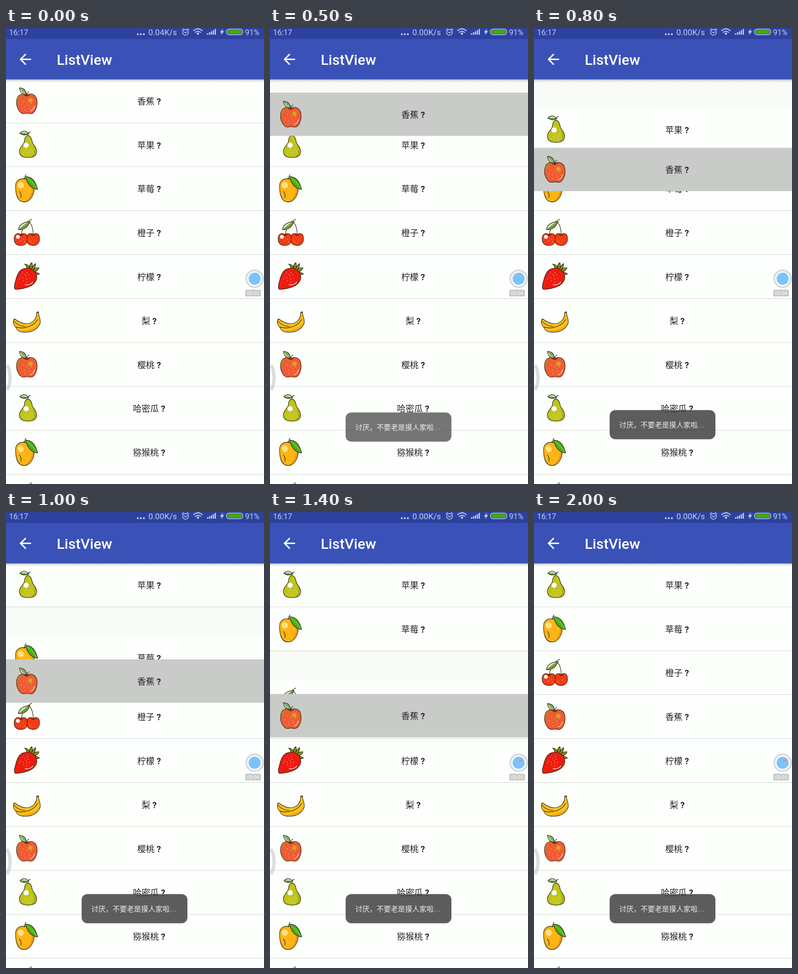
An HTML page for the animation above (2.1 s loop, 539 by 953 pixels).

```html
<!DOCTYPE html>
<html lang="zh-CN">
<head>
<meta charset="utf-8">
<title>ListView</title>
<style>
html, body { margin: 0; width: 100%; height: 100%; overflow: hidden; background: #fdfffd; }
svg { display: block; width: 539px; height: 953px; }
text { font-family: Roboto, "Noto Sans CJK SC", "Noto Sans CJK", sans-serif; }
.label { font-size: 18px; fill: #222; text-anchor: middle; }
.label tspan { font-weight: 700; }
.ink { stroke: #26200f; stroke-width: 1.1; stroke-linejoin: round; stroke-linecap: round; }
.line { fill: none; }
.status { fill: #c8d0ef; font-size: 17px; }
</style>
</head>
<body>
<svg viewBox="0 0 539 953" xmlns="http://www.w3.org/2000/svg">
  <defs>
    <linearGradient id="shade" x2="0" y2="1">
      <stop stop-color="#555" stop-opacity=".5"/>
      <stop offset=".4" stop-color="#777" stop-opacity=".16"/>
      <stop offset="1" stop-color="#999" stop-opacity="0"/>
    </linearGradient>

    <g id="apple">
      <path class="ink" fill="#ef5c35" d="M43-13C37-17 22-17 22 3C22 15 30 26 36 26C40 26 41 25 44 25C47 25 48 26 52 26C59 26 65 14 65 3C65-17 50-17 43-13Z"/>
      <path fill="#cf7a1c" d="M35-14C25-14 22-6 23 4C25 6 26-5 35-14Z"/>
      <circle cx="51" cy="-2" r="6" fill="#d8841d"/><circle cx="51" cy="-2" r="3.5" fill="#e2a134"/>
      <path class="ink line" d="M38-13Q43-9 49-13M44-11Q42-17 48-20"/>
      <path class="ink" fill="#86ad62" d="M28-28Q41-28 43-14Q30-14 28-28Z"/>
      <path fill="#c8e6d0" d="M29-27Q30-16 41-15Q34-18 29-27Z"/>
      <path stroke="#ffd9c4" stroke-width="1.2" fill="none" d="M50 21Q58 18 60 10"/>
    </g>

    <g id="pear">
      <path class="ink" fill="#bfc41b" d="M46-20C52-20 54-12 55-6C57 0 64 4 64 13C64 22 58 26 46 26C34 26 28 22 28 13C28 4 36 0 38-6C39-13 40-20 46-20Z"/>
      <path fill="#a9af16" d="M56-1C64 6 66 22 52 25C60 18 60 8 56-1Z"/>
      <circle cx="42" cy="0" r="5.5" fill="#fff"/>
      <path class="ink line" d="M46-20Q45-26 51-28"/>
      <path class="ink" fill="#66a32c" d="M29-25Q38-34 48-24Q38-18 29-25Z"/>
      <path fill="#cbe9d4" d="M31-25.5Q38-32 46-25Z"/>
    </g>

    <g id="mango">
      <path class="ink" fill="#fdb515" d="M41-22C30-22 20-20 20-6C20 6 22 27 38 27C50 27 58 14 59 0C59-12 52-20 41-22Z"/>
      <path fill="#e6930f" d="M58 0C58 14 50 26 39 26C50 20 55 10 54-2Z"/>
      <circle cx="31" cy="-8" r="6.5" fill="#ffdf88"/>
      <path class="ink line" d="M28 5Q33 10 31 18M38-20Q39-27 42-30"/>
      <path class="ink" fill="#4bad16" d="M41-26Q60-26 66 1Q46-2 41-26Z"/>
      <path stroke="#b8e07a" fill="none" d="M43-24Q54-16 64-1"/>
    </g>

    <g id="cherry">
      <path class="ink" fill="#f23c15" d="M57 3C50-1 43 2 43 13C43 22 49 26 57 26C65 26 70 21 70 12C70 1 63-1 57 3Z"/>
      <path class="ink" fill="#f23c15" d="M31 3C24-1 17 2 17 12C17 22 23 26 31 26C39 26 45 22 45 13C45 1 38-1 31 3Z"/>
      <circle cx="25" cy="8" r="4" fill="#fff"/>
      <path class="ink line" d="M27 4Q31 6 35 4M53 4Q57 6 61 4M32 4Q35-19 54-29M57 4Q57-13 49-23"/>
      <path class="ink" fill="#7e9b2d" d="M26-7Q28-22 50-24Q44-6 26-7Z"/>
      <path fill="#c6ead6" d="M27-8Q29-20 46-23Q37-16 27-8Z"/>
    </g>

    <g id="strawberry">
      <path class="ink" fill="#84931d" d="M43-17Q44-23 39-27Q47-26 50-19Q48-26 54-30Q56-24 54-18Q57-25 62-28Q62-20 57-15Q63-20 69-19Q66-12 59-11Q65-10 70-6Q64-3 59-7Z"/>
      <path class="ink" fill="#ee1b0f" d="M42-18C30-18 24-8 20 8C16 22 17 27 22 26C34 25 52 22 60 12C66 4 65-4 61-10C55-17 48-20 42-18Z"/>
      <path stroke="#ffd8c8" stroke-width="1.6" fill="none" stroke-linecap="round" d="M40 16Q49 18 56 11"/>
    </g>

    <g id="banana">
      <path class="ink" fill="#fcc21d" d="M64-18L68-19C67-10 74-2 71 6C66 18 54 24 40 24C30 24 22 20 21 14C17 10 14 5 16-2L18-4C26 2 34 6 42 6C56 6 65-4 64-18Z"/>
      <path fill="#f0a916" d="M70 2C67 13 50 20 30 21Q34 23 42 23C58 22 70 14 70 2Z"/>
      <path class="ink line" d="M21 13C36 18 58 12 66-3M17 1Q25 11 40 12"/>
      <path class="ink" d="M64-17L68-18M16-2L18-3"/>
    </g>
  </defs>

  <rect width="539" height="953" fill="#f9fbf9"/>
  <g id="dividers" fill="#d6d8d5"></g>
  <g id="rows"></g>

  <path d="M4 707Q13 731 4 754" fill="none" stroke="#000" stroke-opacity=".13" stroke-width="7" stroke-linecap="round"/>

  <rect y="107" width="539" height="8" fill="url(#shade)"/>
  <rect width="539" height="107.3" fill="#3a52b7"/>
  <rect width="539" height="23" fill="#2d429f"/>
  <path transform="translate(22.3 47.5) scale(1.5)" fill="#fff" d="M20 11H7.83l5.59-5.59L12 4l-8 8 8 8 1.41-1.41L7.83 13H20z"/>
  <text x="106" y="76.5" font-size="30.2" font-weight="500" fill="#fff">ListView</text>

  <g class="status">
    <text x="6.5" y="15" style="font-size:16px">16:17</text>
    <circle cx="275.5" cy="13" r="2"/><circle cx="281.7" cy="13" r="2"/><circle cx="288" cy="13" r="2"/>
    <text id="speed" x="297.5" y="15"></text>
    <text x="499.5" y="15" style="font-size:16px">91%</text>
    <g fill="none" stroke="#c8d0ef" stroke-width="1.5" stroke-linecap="round">
      <circle cx="375" cy="9" r="6"/>
      <path d="M372.5 8L375 10.5L378 8M368 4L371 1.5M382 4L379 1.5"/>
      <path stroke-width="2" d="M392 5.5Q401-2 410 5.5M395.500 9Q401 4.500 406.500 9"/>
      <rect x="460.5" y="2.5" width="34" height="11.5" rx="5"/>
    </g>
    <path d="M398 11Q401 8.5 404 11L401 15ZM420 14V11h2.5v3ZM424 14V9h2.5v5ZM428 14V7h2.5v7ZM432 14V4.5h2.5V14ZM436 14V2h2.5v12ZM453 1L447 9.500H450.5L449 15L456 6.5H452Z"/>
    <rect x="462.5" y="4.3" width="30" height="8" rx="3.5" fill="#40ad0b"/>
  </g>

  <g id="toast">
    <rect x="158" y="798.6" width="221" height="61" rx="12" fill="#404240" fill-opacity=".85"/>
    <text x="178" y="835.3" font-size="14.9" font-weight="300" fill="#ececec">讨厌，不要老是摸人家啦<tspan font-size="17" letter-spacing="1">...</tspan></text>
  </g>

  <circle cx="519.5" cy="524" r="17.5" fill="none" stroke="#000" stroke-opacity=".14" stroke-width="4"/>
  <circle cx="519.5" cy="524" r="12.7" fill="#7cc3fd"/>
  <circle id="blip" cx="524" cy="520" r="3.2" fill="#f58a8c"/>
  <rect x="500" y="547" width="32.5" height="14" rx="2" fill="#c5c8c5"/>
  <text id="timer" x="516.3" y="558" font-size="10.5" fill="#fff" text-anchor="middle"></text>
</svg>
<script>
const PITCH = 91.8, TOP = 107, STEP = 100, LOOP = 2100;
const icons = ['apple', 'pear', 'mango', 'cherry', 'strawberry', 'banana'];
const names = ['香蕉', '苹果', '草莓', '橙子', '柠檬', '梨', '樱桃', '哈密瓜', '猕猴桃', '西瓜'];
const $ = id => document.getElementById(id);

// Speckles scattered in an ellipse on the fruit skin: count, cx, cy, rx, ry, colour
const speckles = {
  apple: [9, 43, 9, 16, 11, '#ffc9a8'],
  pear: [12, 47, 15, 13, 8, '#f3f5c0'],
  cherry: [8, 45, 17, 20, 5, '#ffb8a0'],
  strawberry: [12, 39, 0, 13, 11, '#ffe0d0']
};
for (const [id, [count, cx, cy, rx, ry, fill]] of Object.entries(speckles)) {
  for (let i = 0; i < count; i++) {
    const r = Math.sqrt((i + .5) / count), a = i * 2.4;
    $(id).insertAdjacentHTML('beforeend',
      `<circle cx="${cx + rx * r * Math.cos(a)}" cy="${cy + ry * r * Math.sin(a)}" r=".8" fill="${fill}"/>`);
  }
}

names.forEach((name, i) => {
  $('dividers').insertAdjacentHTML('beforeend',
    `<rect y="${TOP + PITCH * (i + 1) - 1.3}" width="539" height="1.4"/>`);
  $('rows').insertAdjacentHTML('beforeend',
    `<g><rect width="539" height="90.5" fill="#fdfffd"/>
     <use href="#${icons[i % 6]}" y="46"/>
     <text class="label" x="299" y="52.8">${name} <tspan>?</tspan></text></g>`);
});
const rows = [...$('rows').children];
const held = rows[0], heldBack = held.firstElementChild;
$('rows').append(held);

const ease = p => .5 - Math.cos(Math.PI * Math.min(1, Math.max(0, p))) / 2;

function track(keys, t) {
  let i = 0;
  while (i < keys.length - 2 && t > keys[i + 1][0]) i++;
  const [t0, a] = keys[i], [t1, b] = keys[i + 1];
  return a + (b - a) * Math.min(1, Math.max(0, (t - t0) / (t1 - t0)));
}

const dragPath = [[300, 0], [400, 6], [500, 28], [600, 58.3], [800, 143.4], [900, 176],
  [1000, 201], [1200, 240.3], [1500, 290], [1700, 315.8], [1800, 315.8], [1900, 300], [2000, PITCH * 3]];
const toastRise = [[300, 46], [400, 24], [500, 5], [600, -3], [800, 0]];
const toastFade = [[200, 0], [300, .04], [400, .4], [500, .85], [600, 1]];
const swapStart = [700, 900, 1300];

const place = (row, y) => row.setAttribute('transform', `translate(0 ${y.toFixed(2)})`);

function draw(t) {
  rows.forEach((row, i) => {
    const start = swapStart[i - 1];
    const shift = start ? ease((t - start) / 250) : 0;
    place(row, TOP + PITCH * (i - shift));
  });
  place(held, TOP + track(dragPath, t));
  heldBack.setAttribute('fill', t >= 200 && t < 2000 ? '#c9cbc9' : '#fdfffd');

  $('toast').setAttribute('transform', `translate(0 ${track(toastRise, t)})`);
  $('toast').setAttribute('opacity', track(toastFade, t));
  $('speed').textContent = t < 400 ? '0.04K/s' : '0.00K/s';
  $('timer').textContent = t < 100 ? '00:03' : t < 1100 ? '00:04' : '00:05';
  $('blip').setAttribute('opacity', t < 1100 ? 0 : 1);
}

const begin = performance.now();
function tick() {
  const t = (performance.now() - begin) % LOOP;
  draw(Math.floor(t / STEP) * STEP);
  requestAnimationFrame(tick);
}
tick();
</script>
</body>
</html>
```
